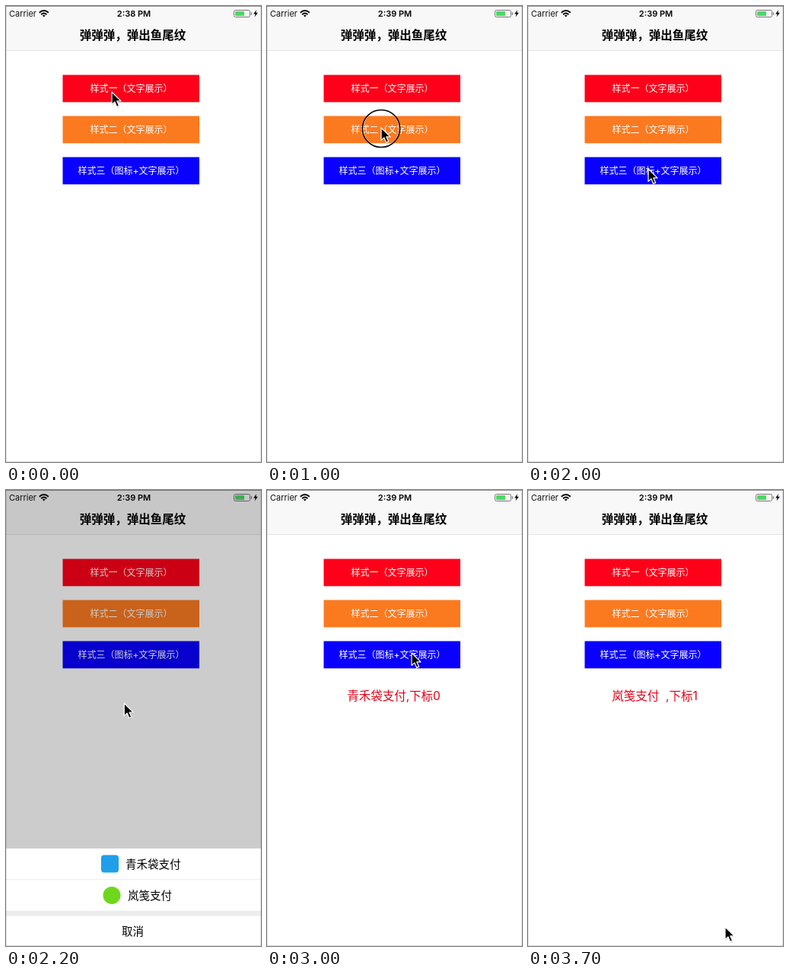
An HTML page for the animation above (3.8 s loop, 335x599 px).

```html
<!DOCTYPE html>
<html lang="zh-CN">
<head>
<meta charset="utf-8">
<style>
html, body { margin: 0; width: 100%; height: 100%; overflow: hidden; background: #fff; }
svg { display: block; width: 335px; height: 599px; }
text { font-family: Inter, "Noto Sans CJK SC", "Noto Sans CJK", sans-serif; white-space: pre; }
</style>
</head>
<body>
<svg id="stage" viewBox="0 0 335 599"></svg>
<script>
const LOOP = 3800, STEP = 100, W = 335, H = 599, ROW = 40.9, FOOT = 46.3;
const stage = document.getElementById('stage');

function add(parent, tag, attrs, content) {
  const el = document.createElementNS('http://www.w3.org/2000/svg', tag);
  for (const k in attrs) el.setAttribute(k, attrs[k]);
  if (content) el.textContent = content;
  parent.appendChild(el);
  return el;
}
const rect = (p, x, y, width, height, fill, rx = 0) =>
  add(p, 'rect', { x, y, width, height, fill, rx });
// y is the middle of the line
const label = (p, s, x, y, size, fill, anchor = 'middle', weight = 400) =>
  add(p, 'text', { x, y: y + size * 0.37, 'font-size': size, fill,
    'text-anchor': anchor, 'font-weight': weight }, s);

// page
rect(stage, 0, 0, W, H, '#fff');
rect(stage, 0, 0, W, 58, '#f8f8f8');
rect(stage, 0, 58, W, 0.6, '#d4d4d4');
label(stage, 'Carrier', 4, 10, 11, '#111', 'start');
const clock = label(stage, '', 168, 10, 11, '#000', 'middle', 600);
label(stage, '弹弹弹，弹出鱼尾纹', 166.5, 38.5, 15.5, '#000', 'middle', 600);

// wifi
const wifi = add(stage, 'g', { fill: 'none', stroke: '#000', 'stroke-width': 1.9 });
add(wifi, 'path', { d: 'M43.8 8.8Q49.8 3.4 55.8 8.8M46.2 11.2Q49.8 8 53.4 11.2' });
add(wifi, 'path', { d: 'M47.9 12.4Q49.8 10.9 51.7 12.4L49.8 14.4Z', fill: '#000', stroke: 'none' });

// battery
add(stage, 'rect', { x: 299.5, y: 5.5, width: 21, height: 9, rx: 2, fill: 'none', stroke: '#777' });
rect(stage, 301, 7, 12, 6, '#4cd964', 0.8);
rect(stage, 321.8, 8.2, 1.3, 3.6, '#777', 0.6);
add(stage, 'path', { d: 'M329 5L325.2 10.6H327.6L326.6 14.6L330.8 8.8H328.2Z', fill: '#000' });

[['样式一（文字展示）', 90.5, '#ff001a'],
 ['样式二（文字展示）', 144.5, '#fb7a20'],
 ['样式三（图标+文字展示）', 198.5, '#0a00ff']].forEach(([s, y, fill]) => {
  rect(stage, 74.5, y, 179.5, 35.8, fill);
  label(stage, s, 164.5, y + 18, 12, '#fff');
});
const result = label(stage, '', 166.5, 270.5, 15.5, '#e60018');

const shade = rect(stage, 0, 0, W, H, '#000');

// sheets
function sheet(items) {
  const height = items.length * ROW + FOOT, top = H - height;
  const g = add(stage, 'g', {});
  rect(g, 0, top, W, height, '#fff');
  items.forEach(({ text, fill = '#000', mark, x = 166.5 }, i) => {
    const y = top + ROW * i, mid = y + 20.6;
    if (i) rect(g, 0, y - 0.4, W, 0.8, '#e4e4e4');
    if (mark === 'square') rect(g, 125, mid - 12, 23, 23, '#1f9fe9', 4);
    if (mark === 'circle') add(g, 'circle', { cx: 139, cy: mid, r: 11.5, fill: '#6fd81e' });
    label(g, text, x, mid, 14.5, fill, mark ? 'start' : 'middle');
  });
  rect(g, 0, H - FOOT, W, 6.8, '#ececec');
  label(g, '取消', 166.5, 580, 14.5, '#000');
  return { g, height };
}
const nth = (n, fill) => ({ text: `我是第${n}个`, fill });
const sheets = {
  two: sheet([nth('一', '#0000c0'), nth('二', '#0000c0')]),
  six: sheet([nth('一', '#b80010'), nth('二', '#0000b8'), nth('三', '#e08020'),
    nth('四', '#000'), nth('五', '#808080'), nth('六', '#20e030')]),
  pay: sheet([{ text: '青禾袋支付', mark: 'square', x: 157 },
    { text: '岚笺支付', mark: 'circle', x: 160 }])
};

// screen edge
rect(stage, 0, 0, 0.8, H, '#00000026');
rect(stage, W - 0.8, 0, 0.8, H, '#00000026');
rect(stage, 0, H - 0.9, W, 0.9, '#00000026');
rect(stage, 0, 0, W, 0.8, '#00000080');

// pointer
const pointer = add(stage, 'g', {});
const ring = add(pointer, 'g', { fill: 'none' });
add(ring, 'circle', { r: 23.6, cy: 1, stroke: '#fff', 'stroke-width': 1, opacity: 0.7 });
add(ring, 'circle', { r: 24.6, cy: 1, stroke: '#000', 'stroke-width': 1.5 });
const arrow = 'M0 0V16.5L3.9 12.9L6.7 19.4L9.6 18.1L6.8 11.9H12Z';
add(pointer, 'path', { d: arrow, fill: '#000', opacity: 0.2, transform: 'translate(.6 1.4)' });
add(pointer, 'path', { d: arrow, fill: '#000', stroke: '#fff', 'stroke-width': 1.2, 'stroke-linejoin': 'round' });

// time, x, y
const path = [
  [0, 139, 113], [200, 139, 113], [500, 138, 359], [700, 160, 575], [800, 160, 575],
  [1000, 150, 160], [1100, 150, 160], [1400, 62, 272], [1500, 53, 279], [1600, 53, 279],
  [2000, 158, 214], [2100, 158, 214], [2500, 147, 479], [2600, 147, 479],
  [3000, 190, 214], [3100, 190, 214], [3300, 215, 421], [3600, 225, 535], [3700, 259, 574]
];
const clicks = [100, 700, 1000, 1500, 2100, 2500, 3100, 3600];
// time, sheet, hidden part, shade
const poses = [
  [0, '', 0, 0], [200, 'two', 0.45, 0.17], [300, 'two', 0.1, 0.29], [400, 'two', 0, 0.32],
  [800, 'two', 0.5, 0.16], [900, '', 0, 0],
  [1100, 'six', 0.4, 0.19], [1200, 'six', 0, 0.32], [1600, '', 0, 0],
  [2200, 'pay', 0, 0.2], [2300, 'pay', 0, 0.32], [2600, 'pay', 0.305, 0.223], [2700, '', 0, 0],
  [3200, 'pay', 0, 0.12], [3300, 'pay', 0, 0.235], [3400, 'pay', 0, 0.32], [3700, '', 0, 0]
];
const results = [[0, ''], [2600, '青禾袋支付,下标0'], [3700, '岚笺支付  ,下标1']];
const current = (table, t) => table.filter(row => row[0] <= t).pop();

function place(t) {
  const a = current(path, t), b = path[path.indexOf(a) + 1] || a;
  const k = b === a ? 0 : (t - a[0]) / (b[0] - a[0]);
  return [a[1] + (b[1] - a[1]) * k, a[2] + (b[2] - a[2]) * k];
}

function draw(t) {
  const [, name, hidden, dark] = current(poses, t);
  for (const key in sheets) {
    const { g, height } = sheets[key];
    g.setAttribute('visibility', key === name ? 'visible' : 'hidden');
    g.setAttribute('transform', `translate(0 ${height * hidden})`);
  }
  shade.setAttribute('opacity', dark);
  clock.textContent = t < 1000 ? '2:38 PM' : '2:39 PM';
  result.textContent = current(results, t)[1];
  pointer.setAttribute('transform', `translate(${place(t)})`);
  ring.setAttribute('visibility', clicks.includes(t) ? 'visible' : 'hidden');
}

const start = performance.now();
function tick() {
  const t = (performance.now() - start) % LOOP;
  draw(Math.floor(t / STEP) * STEP);
  requestAnimationFrame(tick);
}
tick();
</script>
</body>
</html>
```
